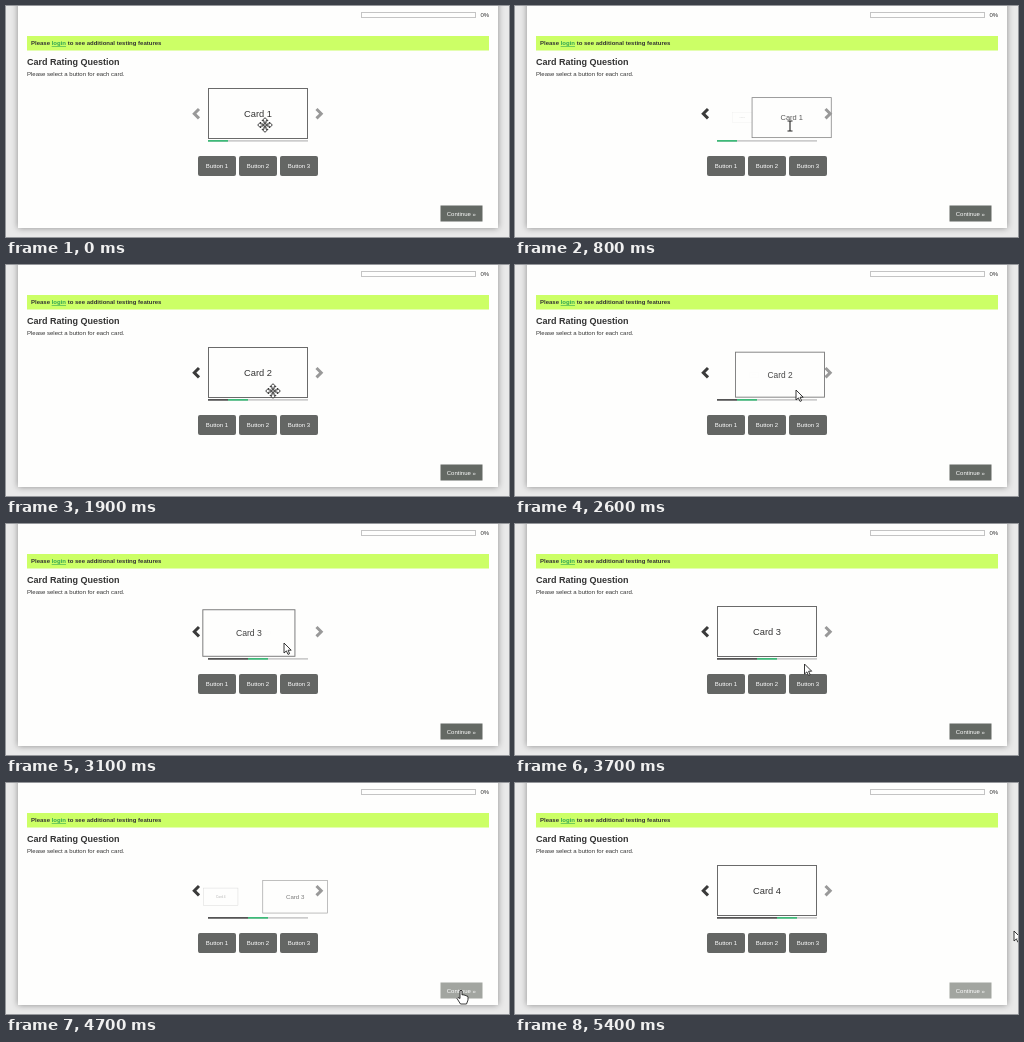
These frames come from a looping animation (503 px wide and 231 px high, 5500 ms). An HTML page:

```html
<!DOCTYPE html>
<html lang="en">
<head>
<meta charset="utf-8">
<title>Card rating</title>
<style>
  html, body { margin: 0; height: 100%; overflow: hidden; background: #e9e9e9; }
  svg { display: block; width: 503px; height: 231px; font: 6px Arial, "Liberation Sans", sans-serif; }
  #page { filter: drop-shadow(0 0 3px #0006); }
  .mid { text-anchor: middle; }
  .white { fill: #fff; }
  .card rect { fill: #fefefd; stroke: #6a6a6a; }
  .card text { font-size: 9.3px; fill: #333; }
  .chevron { fill: none; stroke-width: 3; }
  .pointer { fill: #fff; stroke: #222; stroke-width: .9; stroke-linejoin: round; }
</style>
</head>
<body>
<svg viewBox="0 0 503 231" fill="#333">
  <rect id="page" x="12" y="-8" width="480" height="230" fill="#fefefd"/>
  <rect x="355.5" y="6.5" width="114" height="5" fill="#fefefd" stroke="#c4c4c4"/>
  <text x="474.5" y="11.3">0%</text>
  <rect x="21" y="30" width="462" height="14.5" fill="#cf6"/>
  <text x="25" y="39.2" font-weight="bold">Please <tspan fill="#35a853" text-decoration="underline">login</tspan> to see additional testing features</text>
  <text x="21" y="59.3" font-size="9" font-weight="bold">Card Rating Question</text>
  <text x="21" y="69.6">Please select a button for each card.</text>

  <g id="cards"></g>
  <path id="prev" class="chevron" d="M193 103L188.3 107.7L193 112.4"/>
  <path id="next" class="chevron" d="M310.5 103L315.2 107.7L310.5 112.4"/>

  <g id="progress">
    <rect x="202" y="134" width="100" height="1.7" fill="#ccc"/>
    <rect id="done" x="202" y="134" height="1.7" fill="#555"/>
    <rect id="current" y="134" width="20" height="1.7" fill="#3dba78"/>
  </g>
  <g id="buttons"></g>
  <rect id="continue" x="434.5" y="199.5" width="42" height="16"/>
  <text class="mid white" x="455.3" y="209.6">Continue »</text>

  <g id="cursor">
    <path id="arrow" class="pointer" d="M0 0V10L2.4 7.9L4 11.4L5.6 10.7L4.1 7.2H7.2Z"/>
    <path id="hand" class="pointer" d="M-1 1Q0 -1 1 1V5Q2 4 3 5.2Q4 4.6 5 5.8Q7 5.4 7 7.5V10L5.5 14H-.5L-4 8.5Q-3.5 6.5 -1 8.5Z"/>
    <path id="ibeam" fill="none" stroke="#222" stroke-width="1.1" d="M-2.5 -5H2.5M-2.5 5H2.5M0 -5V5"/>
    <g id="move" class="pointer"></g>
  </g>
</svg>
<script>
const LOOP = 5500, STEP = 100, TURN = 800;
const CLICKS = [400, 2200, 4200];
const TURNS = [564, 2436, 4380];
const BUTTON_X = [192, 233, 274];
// time, x, y of the pointer hot spot
const PATH = [
  [0, 259, 119], [400, 212, 160], [600, 212, 160], [800, 275, 120], [1600, 275, 120],
  [1900, 267, 126], [2200, 253, 158], [2500, 253, 158], [2600, 281, 125], [3100, 278, 119],
  [3400, 278, 119], [4000, 301, 161], [4200, 301, 161], [4700, 455, 207], [5000, 455, 207],
  [5300, 487, 163], [5400, 499, 148]
];

const el = id => document.getElementById(id);
const fill = (id, color) => el(id).setAttribute('fill', color);

el('cards').innerHTML = [1, 2, 3, 4].map(n =>
  `<g class="card mid" id="card${n}"><rect x="-49.5" y="-25" width="99" height="50"/>
   <text y="3.3">Card ${n}</text></g>`).join('');
el('buttons').innerHTML = BUTTON_X.map((x, i) =>
  `<rect id="button${i}" x="${x}" y="150" width="38" height="20" rx="2"/>
   <text class="mid white" x="${x + 19}" y="162">Button ${i + 1}</text>`).join('');
el('move').innerHTML = [0, 90, 180, 270].map(a =>
  `<path transform="rotate(${a})" d="M-1 -2V-4.3H-3L0 -7.3L3 -4.3H1V-2Z"/>`).join('') +
  '<rect x="-1.2" y="-1.2" width="2.4" height="2.4"/>';

function pointerAt(t) {
  const i = PATH.findLastIndex(p => p[0] <= t);
  const [t0, x0, y0] = PATH[i], [t1, x1, y1] = PATH[i + 1] || [LOOP, x0, y0];
  const k = (t - t0) / (t1 - t0);
  return [x0 + (x1 - x0) * k, y0 + (y1 - y0) * k];
}

// eased progress of one turn, settled at both ends
function turnProgress(t, start) {
  const k = Math.min(1, Math.max(0, (t - start) / TURN));
  const s = (1 - Math.cos(Math.PI * k)) / 2;
  return s < .02 ? 0 : s > .98 ? 1 : s;
}

// side: 1 leaves to the right, -1 arrives from the left
function placeCard(n, size, side) {
  const card = el('card' + n), arc = Math.sin(Math.PI * size);
  const x = 252 + side * 42 * arc;
  card.setAttribute('transform', `translate(${x} ${107.5 + 7 * arc}) scale(${size})`);
  card.setAttribute('opacity', size);
  if (size > .5) el('cards').append(card);
  return x;
}

function draw(t) {
  const turns = TURNS.map(start => turnProgress(t, start));
  const active = turns.findIndex(s => s > 0 && s < 1);
  const front = turns.filter(s => s > .5).length;
  let frontX = 252;
  for (let i = 0; i < 4; i++) {
    const entered = i ? turns[i - 1] : 1, left = i < 3 ? turns[i] : 0;
    const x = left ? placeCard(i + 1, 1 - left, 1) : placeCard(i + 1, entered, -1);
    if (i === front) frontX = x;
  }
  el('done').setAttribute('width', 20 * front);
  el('current').setAttribute('x', 202 + 20 * front);

  const answered = CLICKS.some((c, i) => t >= c && t < TURNS[i]);
  el('prev').setAttribute('stroke', t >= TURNS[0] ? '#3a3a3a' : '#999');
  el('next').setAttribute('stroke', answered ? '#3a3a3a' : '#999');

  const [x, y] = pointerAt(t);
  const hovered = y >= 150 && y < 170 ? BUTTON_X.findIndex(b => x >= b && x < b + 38) : -1;
  const onContinue = x > 434 && x < 477 && y > 199 && y < 216;
  BUTTON_X.forEach((_, i) => fill('button' + i, i === hovered ? '#3cb964' : '#646664'));
  fill('continue', t >= 4700 ? '#a2a5a0' : '#646964');

  let shape = 'arrow';
  if (hovered >= 0 || onContinue) shape = 'hand';
  else if (active >= 0) {
    if (Math.abs(x - frontX) < 12 && y < 125) shape = 'ibeam';
  } else if (x > 202 && x < 302 && y > 82 && y < 133) shape = 'move';
  for (const id of ['arrow', 'hand', 'ibeam', 'move'])
    el(id).style.display = id === shape ? '' : 'none';
  el('cursor').setAttribute('transform', `translate(${x} ${y})`);
}

function tick() {
  draw(Math.floor(performance.now() % LOOP / STEP) * STEP);
  requestAnimationFrame(tick);
}
tick();
</script>
</body>
</html>
```
